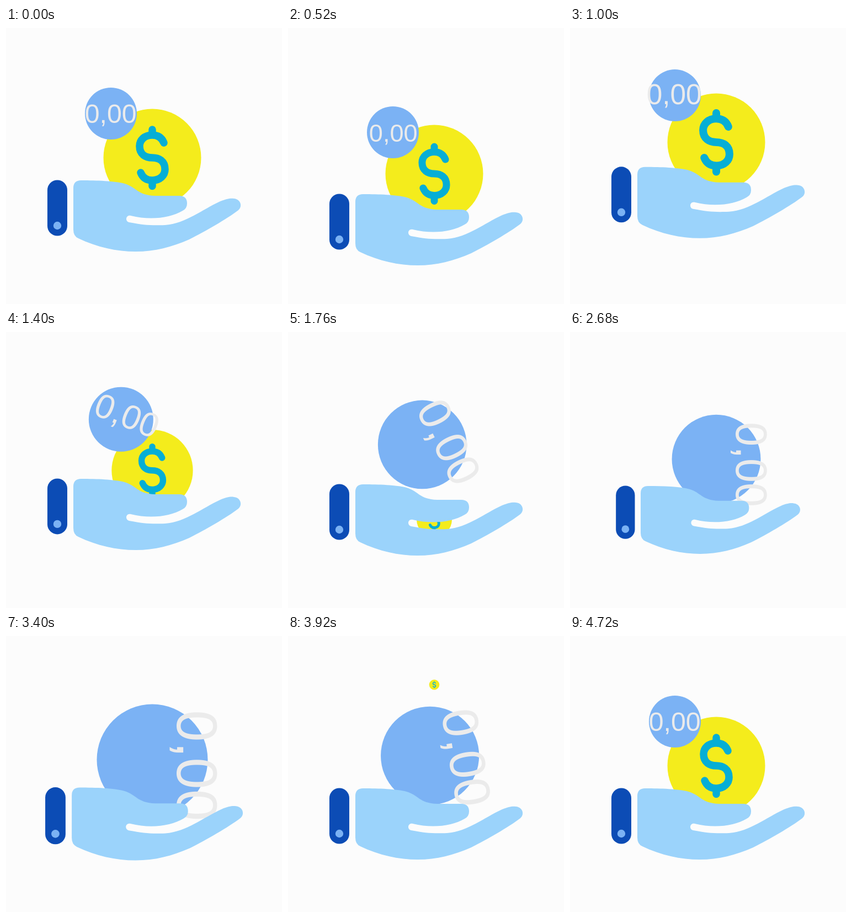
Write an HTML page that moves like this. It is 500 by 500 pixels and loops after 5000 ms.

```html
<!DOCTYPE html>
<html lang="en">
<head>
<meta charset="utf-8">
<title>Coin in hand</title>
<style>
  html, body { margin: 0; width: 100%; height: 100%; overflow: hidden; background: #fcfcfc; }
  svg { display: block; width: 100%; height: 100%; }
  text { font: 48.3px "Liberation Sans", Arial, sans-serif; text-anchor: middle; fill: #ebebeb; }
</style>
</head>
<body>
<svg viewBox="0 0 500 500">
  <g id="coin">
    <circle r="88.5" fill="#f4ec1c"/>
    <path id="dollar" fill="none" stroke="#06aed5" stroke-width="13.5" stroke-linecap="round"
      d="M21 -27C17 -37 9 -41 0 -41C-14 -41 -23 -32 -23 -21C-23 -6 -12 0 0 0S23 6 23 21C23 32 14 41 0 41C-9 41 -17 37 -21 27M0 -51V-41M0 41V51.5"/>
  </g>
  <circle id="bubble" r="47" fill="#7bb2f4"/>
  <g id="amount"><text x="-16.5" y="-5">0,00</text></g>
  <g id="hand">
    <rect x="75" y="275.5" width="36" height="101" rx="18" fill="#0c4cb5"/>
    <circle cx="93" cy="358" r="7.2" fill="#7bb2f4"/>
    <path fill="#9bd3fb" d="M122 290Q122 276 136 276C165 276 196 277 215 282C236 288 238 303 270 304H314Q328 304 328 318Q328 327 320 331C298 344 262 349 226 340C217 338 215 350 223 352C250 357 262 358 288 357C326 354 355 329 388 314C400 309 407 308 413 309C425 310 429 323 421 330C400 346 360 369 332 383C300 397 270 405 235 405C200 405 165 397 131 381Q122 377 122 365Z"/>
  </g>
</svg>
<script>
const LOOP = 5000;
const PIVOT = { x: 16.2, y: 21.5 };   // the amount turns around this point of the bubble
const mix = (a, b, p) => a + (b - a) * p;

// Smooth step from 0 to 1 between two times
function ease(t, from, to) {
  const x = Math.min(1, Math.max(0, (t - from) / (to - from)));
  return x * x * (3 - 2 * x);
}

function place(id, x, y, scale, angle = 0) {
  document.getElementById(id).setAttribute("transform",
    `translate(${x} ${y}) rotate(${angle}) scale(${scale})`);
}

function draw(t) {
  // Everything dips, rises and settles; later hand and bubble shrink, swell and settle
  const lift = -ease(t, 0, 520) + 2 * ease(t, 520, 1040) - ease(t, 1040, 1680);
  const pulse = -.78 * ease(t, 2160, 2680) + 1.78 * ease(t, 2680, 3120) - ease(t, 3120, 3600);
  const back = ease(t, 3720, 4720);
  const swap = ease(t, 1040, 2160) - back;

  // The coin sinks behind the hand, then drops in again from above
  const coinSize = 1 - ease(t, 1120, 2200) + back;
  place("coin", 265, mix(t < 3000 ? 399 : 71, 235, coinSize) - 29 * lift, coinSize);
  place("dollar", 0, 0, 1 + .04 * lift);

  const x = mix(190, 265, swap);
  const y = mix(155, 224, swap) - 34 * lift + 8 * Math.max(0, -pulse);
  const size = (1 + swap) * (1 + .185 * pulse);
  const textSize = size * (1 + .065 * lift - .058 * Math.max(0, -pulse));
  place("bubble", x, y, size);
  place("amount", x + PIVOT.x * size, y + PIVOT.y * size, textSize, 90 * swap);

  const handSize = 1 + .06 * pulse;
  place("hand", 250 * (1 - handSize), 340 * (1 - handSize) - 25 * lift, handSize);
}

const start = performance.now();
function tick() {
  draw((performance.now() - start) % LOOP);
  requestAnimationFrame(tick);
}
tick();
</script>
</body>
</html>
```
